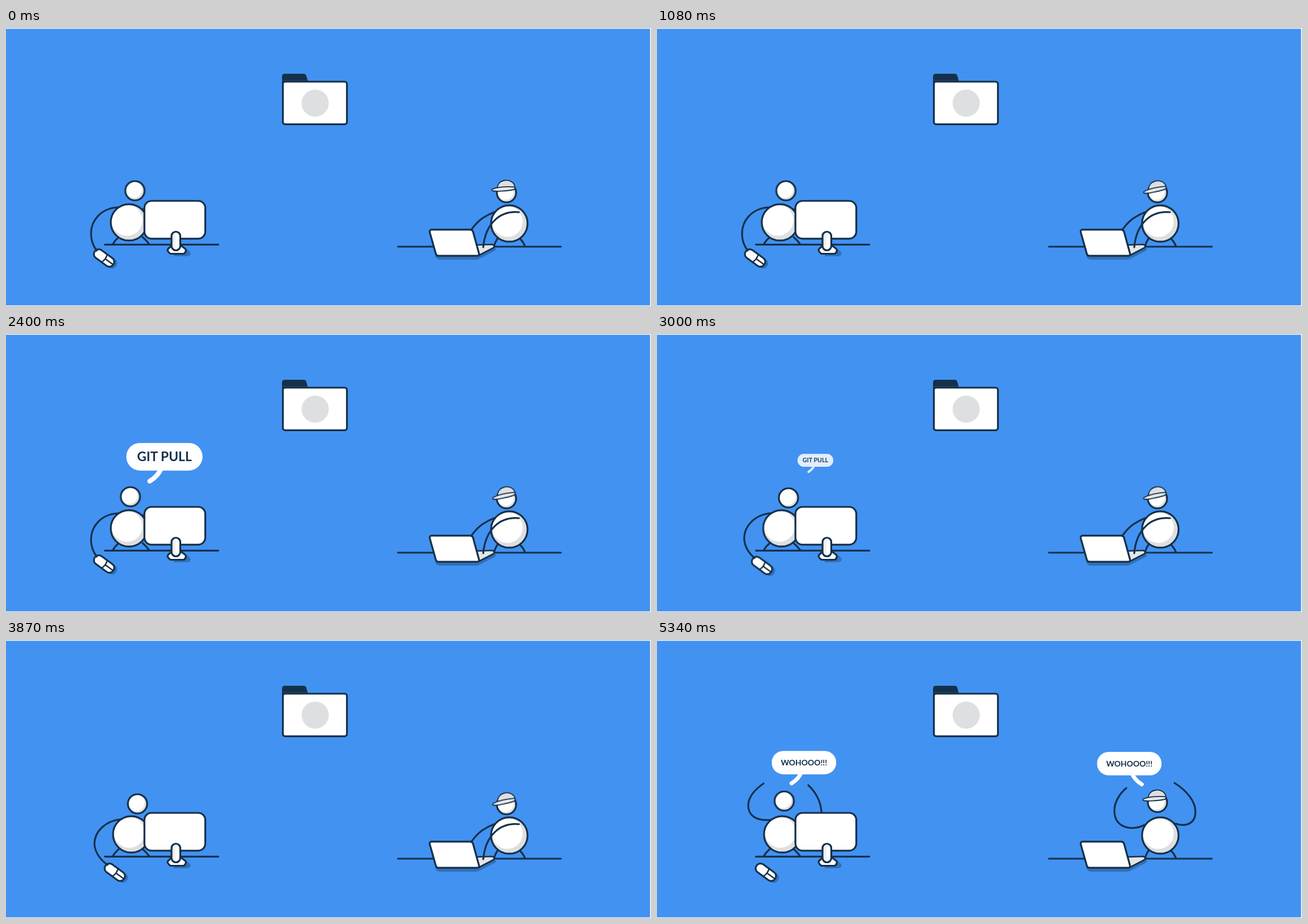
Write an HTML page that moves like this. It is 1138 px wide and 492 px high and loops after 5.97 s.

```html
<!DOCTYPE html>
<html lang="en">
<head>
<meta charset="utf-8">
<title>Push and pull</title>
<style>
  html, body { margin: 0; width: 100%; height: 100%; overflow: hidden; background: #fff; }
  svg { display: block; width: 100%; height: 100%; }

  .line { fill: none; stroke: #14304a; stroke-width: 3.2; stroke-linecap: round; stroke-linejoin: round; }
  .solid { fill: #fff; }
  .shade { fill: #dedfe1; }
  .thin { stroke-width: 1.8; }
  .shadow { fill: #14304a; opacity: .35; }
  .trail { stroke-dasharray: 6.6 10; }
  .reveal { fill: none; stroke: #fff; stroke-width: 12; }
  .bubble text { font: 700 19.3px Lato, Inter, sans-serif; fill: #14304a; text-anchor: middle; }
  .bubble .cheer { font-size: 13.9px; }
  .tail { fill: none; stroke: #fff; stroke-width: 7; stroke-linecap: round; }

  .run { animation: 5970ms linear infinite both; }
  .pop { animation-name: pop; }
  .burst { animation-name: burst; }
  .shout { animation-name: shout; }
  .push { animation-delay: 30ms; }
  .pull { animation-delay: 2200ms; }
  .at-folder { animation-delay: 1680ms; }
  .at-screen { animation-delay: 3330ms; }
  .cap { animation-name: cap; }
  .nod { animation-name: nod; }
  .look { animation-name: look; }
  .typing { animation-name: typing; }
  .mouse { animation-name: mouse; }
  .lean { animation-name: lean; }
  .send { animation-name: send; }
  .fetch { animation-name: fetch; }
  .arm-a { animation-name: armA; }
  .arm-b { animation-name: armB; }
  .arm-c { animation-name: armC; }
  .arm-d { animation-name: armD; }

  @keyframes pop {
    0% { transform: scale(0); opacity: .3; animation-timing-function: ease-out; }
    2.51% { transform: scale(1.3); opacity: 1; }
    5.03% { transform: scale(.95); }
    7.54% { transform: scale(1.03); }
    9.55%, 12.06% { transform: scale(1); opacity: 1; }
    13.4% { transform: scale(.56); opacity: .85; }
    15.08%, 100% { transform: scale(0); opacity: 0; }
  }
  @keyframes shout {
    0%, 72.36% { transform: scale(0); opacity: .3; animation-timing-function: ease-out; }
    74.87% { transform: scale(1.3); opacity: 1; }
    77.39% { transform: scale(.95); }
    79.9% { transform: scale(1.05); }
    83.75%, 100% { transform: scale(1); opacity: 1; }
  }
  @keyframes burst {
    0% { transform: scale(0); opacity: .4; animation-timing-function: cubic-bezier(.22, .7, .35, 1); }
    5.03% { transform: scale(1); opacity: .15; }
    7.54%, 100% { transform: scale(1); opacity: 0; }
  }
  @keyframes cap {
    0%, .5% { transform: rotate(0deg); animation-timing-function: ease-in-out; }
    4.2%, 72.4% { transform: rotate(-8deg); animation-timing-function: ease-in-out; }
    75%, 100% { transform: rotate(0deg); }
  }
  @keyframes nod {
    0%, .5% { transform: translate(0, 0); }
    2.5% { transform: translate(0, 2px); }
    5%, 72.4% { transform: translate(0, 0); }
    75% { transform: translate(0, -7px); }
    78% { transform: translate(0, -2px); }
    81% { transform: translate(0, -5px); }
    84%, 100% { transform: translate(0, -4px); }
  }
  @keyframes look {
    0%, 36.85% { transform: translate(0, 0); animation-timing-function: ease-in-out; }
    39.4%, 43.55% { transform: translate(-8px, 0); animation-timing-function: ease-in-out; }
    47.7%, 71.7% { transform: translate(4.5px, 2px); animation-timing-function: ease-out; }
    75% { transform: translate(-3px, -6px); }
    78% { transform: translate(-3px, -1px); }
    81% { transform: translate(-3px, -4px); }
    84%, 100% { transform: translate(-3px, -3px); }
  }
  @keyframes typing {
    0%, 15.08%, 18.09%, 21.1%, 24.12%, 100% { transform: translate(0, 0); }
    16.6%, 22.6% { transform: translate(1.5px, -1px); }
    19.6% { transform: translate(-1px, 1px); }
  }
  @keyframes mouse {
    0%, 45.2% { transform: translate(0, 0); animation-timing-function: ease-in-out; }
    53.9%, 100% { transform: translate(19px, 4px); }
  }
  @keyframes lean {
    0%, 45.2% { transform: translate(0, 0); animation-timing-function: ease-in-out; }
    53.9%, 100% { transform: translate(4px, 0); }
  }
  /* visible stretch of each trail: gap before, then length */
  @keyframes send {
    0%, 21.78% { stroke-dasharray: 0 100 0 200; }
    25.13% { stroke-dasharray: 0 33 67 200; }
    26.8% { stroke-dasharray: 0 0 80 200; }
    33.5%, 100% { stroke-dasharray: 0 0 0 200; }
  }
  @keyframes fetch {
    0%, 50.75% { stroke-dasharray: 0 0 0 200; }
    52.76% { stroke-dasharray: 0 0 44 200; }
    55.28% { stroke-dasharray: 0 37 63 200; }
    59.63%, 100% { stroke-dasharray: 0 100 0 200; }
  }
  @keyframes armA {
    0%, 45.2% { d: path("M201 317 C166 318 150 342 150 364 C150 376 154 386 160 394"); animation-timing-function: ease-in-out; }
    53.9%, 70.85% { d: path("M204 317 C174 320 156 340 156 361 C157 377 167 389 179 398"); animation-timing-function: ease-out; }
    76.4%, 100% { d: path("M204 318 C172 322 161 308 161 293 C161 278 172 265 188 254"); }
  }
  @keyframes armB {
    0%, 70.85% { d: path("M238 321 C262 318 280 330 285 345 C288 355 288 360 288 365"); animation-timing-function: ease-out; }
    76.4%, 100% { d: path("M238 321 C270 330 290 318 290 303 C289 287 281 270 267 257"); }
  }
  @keyframes armC {
    0%, 70.85% { d: path("M861 326 C853 329 846 333 840 337 C832 343 826 350 821 357"); animation-timing-function: ease-out; }
    76.4%, 100% { d: path("M861 327 C836 339 807 332 807 302 C807 287 816 272 828 262"); }
  }
  @keyframes armD {
    0%, 70.85% { d: path("M905 326 C888.5 324.5 873.7 329.2 862.6 339.8 C851.5 350.2 844 366.5 842 388"); animation-timing-function: ease-out; }
    76.4%, 100% { d: path("M915 325 C932 331 950 326 950 304 C950 285 934 266 913 253"); }
  }
</style>
</head>
<body>
<svg viewBox="0 0 1138 492" preserveAspectRatio="none">
  <defs>
    <g id="head">
      <circle class="shade" r="17"/>
      <circle class="solid" cx="-1.8" cy="-1.8" r="14.4"/>
      <circle class="line" r="17"/>
    </g>
    <g id="torso">
      <circle class="shade" r="32.2"/>
      <circle class="solid" cx="-3.5" cy="-3.5" r="27.2"/>
      <circle class="line" r="32.2"/>
    </g>
    <g id="balloon">
      <rect class="solid" x="-57" y="-31" width="114" height="41.5" rx="20.7"/>
      <path class="tail" d="M-5 8 Q-10 19 -22 26.5"/>
    </g>
    <linearGradient id="stand">
      <stop offset="0" stop-color="#dedfe1"/>
      <stop offset=".6" stop-color="#fff"/>
    </linearGradient>
    <mask id="sendMask" maskUnits="userSpaceOnUse" x="600" y="100" width="260" height="220">
      <path class="reveal run send" pathLength="100" d="M652 150 Q760 165 805 270"/>
    </mask>
    <mask id="fetchMask" maskUnits="userSpaceOnUse" x="240" y="100" width="260" height="220">
      <path class="reveal run fetch" pathLength="100" d="M438 150 Q330 165 285 270"/>
    </mask>
  </defs>

  <rect y="1.3" width="1136.4" height="489.6" fill="#4292f1"/>

  <g transform="translate(545 130)"><circle class="solid run burst at-folder" r="110"/></g>
  <g transform="translate(298.5 349)"><circle class="solid run burst at-screen" r="110"/></g>

  <!-- folder -->
  <path fill="#14304a" d="M487 98 V86 Q487 81 492 81 H525 Q529 81 530 85 L533 96 Z"/>
  <path stroke="#35536e" stroke-width=".8" d="M488 92.8 H531"/>
  <rect class="line solid" style="fill:#fff" x="488.5" y="95" width="113" height="75.4" rx="4"/>
  <circle class="shade" cx="545.5" cy="133" r="24"/>

  <!-- trails -->
  <g mask="url(#sendMask)"><path class="line trail" d="M653 150.2 Q760 165 805 270"/></g>
  <g mask="url(#fetchMask)"><path class="line trail" d="M437 150.2 Q330 165 285 270"/></g>

  <!-- left desk -->
  <path class="line" d="M174.5 383.3 H374.5 M199 370 Q192 376 188 383 M241 370 Q248 376 253 383"/>
  <g transform="translate(173 407)">
    <g class="run mouse">
      <rect class="shadow" x="-20" y="-9" width="40" height="18" rx="8" transform="translate(5 3) rotate(36)"/>
      <g transform="rotate(36)">
        <rect class="line" style="fill:#fff" x="-20" y="-8.5" width="40" height="17" rx="8"/>
        <path class="line" style="stroke-width:2.4" d="M1 -8 Q4 0 1 8 M3 0 H19"/>
      </g>
    </g>
  </g>
  <path class="line run arm-a" d="M201 317 C166 318 150 342 150 364 C150 376 154 386 160 394"/>
  <path class="line run arm-b" d="M238 321 C262 318 280 330 285 345 C288 355 288 360 288 365"/>
  <g transform="translate(217 344)"><use class="run lean" href="#torso"/></g>
  <g transform="translate(227.5 288)"><use class="run look" href="#head"/></g>
  <rect class="line" style="fill:#fff" x="244.2" y="306" width="107.4" height="66.8" rx="12.5"/>
  <path class="shadow" d="M297 390 H317 Q325 395 326 399 Q325 404 318 404 H296 Z"/>
  <path class="line" style="fill:#fff" d="M291 386 H310 L316.5 391 Q319 395 314 399.5 H290 Q283 394 286 391 Z"/>
  <rect class="line" style="fill:url(#stand)" x="292" y="360.5" width="15.5" height="33" rx="7.7"/>

  <!-- right desk -->
  <path class="line" d="M691.5 387 H979 M867 373 Q863 379 861 386 M907 373 Q913 379 915.5 386"/>
  <g class="run typing">
    <path class="line run arm-c" d="M861 326 C853 329 846 333 840 337 C832 343 826 350 821 357"/>
    <use href="#torso" x="888" y="346"/>
  </g>
  <path class="shadow" d="M757 403 H834 L861 388 Q867 391 863 394 L836 408 Q833 410 828 410 H765 Q759 409 757 403 Z"/>
  <path class="line shade" style="fill:#e4e5e7;stroke-width:2.6" d="M830 384 L858 383 Q863 385 860 389 L835 402 Z"/>
  <path class="line" style="fill:#fff" d="M751 356.8 H819 Q823 356.8 824 360.5 L834.5 399 Q835 403.2 831 403.2 H763 Q759.5 403.2 758.5 400 L747.5 361 Q747 357 751 356.8 Z"/>
  <g class="run typing">
    <path class="line run arm-d" d="M905 326 C888.5 324.5 873.7 329.2 862.6 339.8 C851.5 350.2 844 366.5 842 388"/>
  </g>
  <g class="run nod">
    <use href="#head" x="883" y="291.5"/>
    <g transform="translate(890 280)">
      <g class="run cap">
        <path class="line thin" style="fill:#dedfe1" d="M-23 4 C-24 -14 6 -16 8 2 Z"/>
        <path class="line thin" style="fill:#e6e7e9" d="M-32.5 5.5 C-24 1.5 -6 0 8 1.5 Q9 4 6 6 C-6 8.5 -30 10 -32.5 7.5 Z"/>
      </g>
    </g>
  </g>

  <!-- speech -->
  <g class="bubble" transform="translate(833 229)">
    <g class="run pop push"><use href="#balloon" transform="scale(-1 1)"/><text y="-4">GIT PUSH</text></g>
  </g>
  <g class="bubble" transform="translate(279.5 229.3)">
    <g class="run pop pull"><use href="#balloon"/><text y="-4">GIT PULL</text></g>
  </g>
  <g class="bubble" transform="translate(259.3 227.2)">
    <g class="run shout"><use href="#balloon"/><text class="cheer" y="-5.3">WOHOOO!!!</text></g>
  </g>
  <g class="bubble" transform="translate(833.3 229)">
    <g class="run shout"><use href="#balloon" transform="scale(-1 1)"/><text class="cheer" y="-4.6">WOHOOO!!!</text></g>
  </g>
</svg>
</body>
</html>
```
